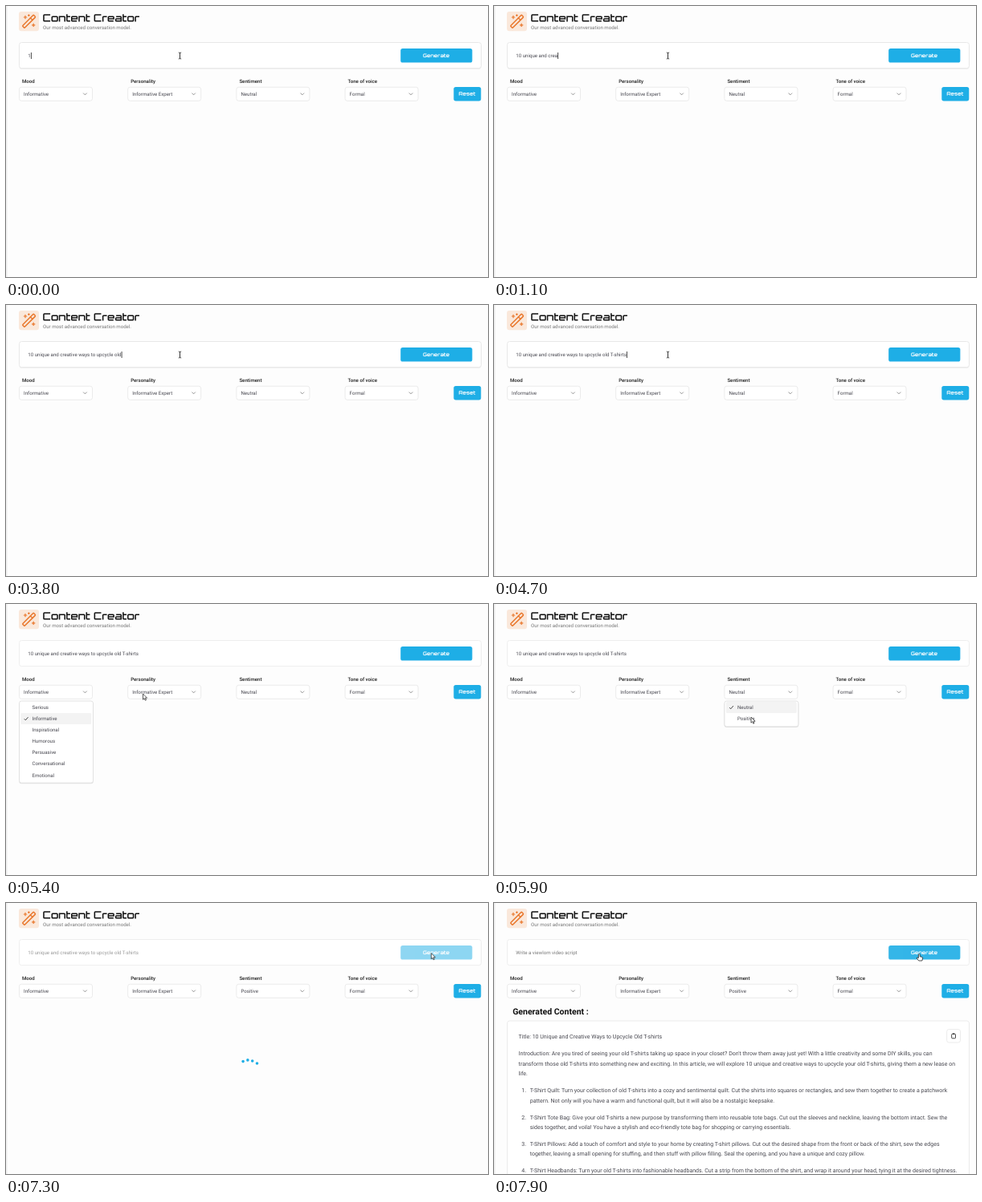
Recreate the animation shown at these times as an HTML page. Size 600 px wide and 338 px high, loop 8000 ms.

```html
<!DOCTYPE html>
<html lang="en">
<head>
<meta charset="utf-8">
<title>Content Creator</title>
<style>
  html, body { margin: 0; width: 100%; height: 100%; overflow: hidden; background: #fdfdfd; }
  svg { display: block; width: 600px; height: 338px; }
  text { font-family: Roboto, "Liberation Sans", sans-serif; font-size: 6.14px; white-space: pre; text-rendering: geometricPrecision; }
</style>
</head>
<body>
<svg id="stage" viewBox="0 0 600 338"></svg>
<script>
const LOOP = 8000, STEP = 100;
const BLUR = 5200, LOADING = 6900, DONE = 7600;
const BLUE = '#1eaee6', ORANGE = '#e9772c', PEACH = '#fae8db', EDGE = '#e9e9e9';
const PROMPT = '10 unique and creative ways to upcycle old T-shirts';
const HINT = 'Write a viewlom video script';

// Time, number of characters typed
const TYPED = [[0, 1], [900, 15], [1500, 23], [1600, 23], [2000, 27], [2200, 27], [3800, 42], [4600, 51]];

// Time, x, y of the pointer
const PATH = [
  [0, 216.5, 62], [4700, 216.5, 62], [5200, 60, 111], [5300, 62, 111],
  [5400, 170.5, 112], [5500, 172, 112], [5700, 322, 112], [5900, 320, 141],
  [6000, 321, 142], [6300, 455, 112], [6400, 456, 112], [6500, 456.5, 112],
  [6800, 529.3, 62.6]
];

const FIELDS = [
  { label: 'Mood', value: 'Informative', from: 5300, to: 5500,
    items: ['Serious', 'Informative', 'Inspirational', 'Humorous', 'Persuasive', 'Conversational', 'Emotional'] },
  { label: 'Personality', value: 'Informative Expert' },
  { label: 'Sentiment', value: 'Neutral', next: 'Positive', from: 5800, to: 6100,
    items: ['Neutral', 'Positive'] },
  { label: 'Tone of voice', value: 'Formal', from: 6300, to: 6600,
    items: ['Cheeky', 'Formal', 'Bold', 'Pirates'] }
];

const INTRO = [
  [167, 'Title: 10 Unique and Creative Ways to Upcycle Old T-shirts'],
  [188, "Introduction: Are you tired of seeing your old T-shirts taking up space in your closet? Don't throw them away just yet! With a little creativity and some DIY skills, you can"],
  [200.3, 'transform those old T-shirts into something new and exciting. In this article, we will explore 10 unique and creative ways to upcycle your old T-shirts, giving them a new lease on'],
  [212.6, 'life.']
];
const LIST = [
  ['T-Shirt Quilt: Turn your collection of old T-shirts into a cozy and sentimental quilt. Cut the shirts into squares or rectangles, and sew them together to create a patchwork',
   'pattern. Not only will you have a warm and functional quilt, but it will also be a nostalgic keepsake.'],
  ['T-Shirt Tote Bag: Give your old T-shirts a new purpose by transforming them into reusable tote bags. Cut out the sleeves and neckline, leaving the bottom intact. Sew the',
   'sides together, and voila! You have a stylish and eco-friendly tote bag for shopping or carrying essentials.'],
  ['T-Shirt Pillows: Add a touch of comfort and style to your home by creating T-shirt pillows. Cut out the desired shape from the front or back of the shirt, sew the edges',
   'together, leaving a small opening for stuffing, and then stuff with pillow filling. Seal the opening, and you have a unique and cozy pillow.'],
  ['T-Shirt Headbands: Turn your old T-shirts into fashionable headbands. Cut a strip from the bottom of the shirt, and wrap it around your head, tying it at the desired tightness.']
];

// Square display lettering: advance and stroke, 100 units per em
const GLYPHS = {
  ' ': [32, ''],
  C: [80, 'M73-66H16Q10-66 10-60V-12Q10-6 16-6H73'],
  G: [80, 'M73-66H16Q10-66 10-60V-12Q10-6 16-6H64Q70-6 70-12V-32H44'],
  R: [80, 'M10 0V-66H64Q70-66 70-60V-34Q70-28 64-28H10M50-28L70 0'],
  a: [72, 'M14-50H56Q62-50 62-44V-6H16Q10-6 10-12V-22Q10-28 16-28H62'],
  e: [72, 'M10-28H62V-44Q62-50 56-50H16Q10-50 10-44V-12Q10-6 16-6H60'],
  n: [72, 'M10 0V-50H56Q62-50 62-44V0'],
  o: [72, 'M16-50H56Q62-50 62-44V-12Q62-6 56-6H16Q10-6 10-12V-44Q10-50 16-50Z'],
  r: [52, 'M10 0V-44Q10-50 16-50H48'],
  s: [70, 'M60-50H16Q10-50 10-44V-34Q10-28 16-28H54Q60-28 60-22V-12Q60-6 54-6H10'],
  t: [46, 'M10-72V-12Q10-6 16-6H42M10-50H42']
};

const stage = document.getElementById('stage');

function at(keys, t, ease = k => k) {
  const i = keys.findIndex(k => k[0] > t);
  if (i < 0) return keys[keys.length - 1].slice(1);
  const a = keys[i - 1], b = keys[i];
  const k = ease((t - a[0]) / (b[0] - a[0]));
  return a.slice(1).map((v, n) => v + (b[n + 1] - v) * k);
}
const smooth = k => k * k * (3 - 2 * k);
const isBusy = t => t >= LOADING && t < DONE;
const overButton = ([x, y]) => x > 491 && y < 71;

const text = (x, y, str, fill = '#484850', extra = '') =>
  `<text x="${x}" y="${y}" fill="${fill}" ${extra}>${str}</text>`;

const box = (x, y, w, h, r, fill, stroke = 'none', extra = '') =>
  `<rect x="${x}" y="${y}" width="${w}" height="${h}" rx="${r}" fill="${fill}" stroke="${stroke}" ${extra}/>`;

const panel = (x, y, w, h, r, edge = EDGE) => box(x, y, w, h, r, '#fff', edge, 'stroke-width=".9"');

const line = (d, stroke, width, extra = '') =>
  `<path d="${d}" fill="none" stroke="${stroke}" stroke-width="${width}" ${extra}/>`;

function lettering(x, y, size, str, color, weight) {
  let pen = 0, out = '';
  for (const c of str) {
    const [advance, d] = GLYPHS[c];
    out += `<path d="${d}" transform="translate(${pen} 0)"/>`;
    pen += advance;
  }
  return `<g role="img" aria-label="${str}" fill="none" stroke="${color}" stroke-width="${weight}"
    transform="translate(${x} ${y}) scale(${size / 100})">${out}</g>`;
}

function wand() {
  const plus = (x, y, r) => line(`M${x - r} ${y}h${2 * r}M${x} ${y - r}v${2 * r}`, ORANGE, 1.2);
  return box(16, 7, 25, 24.3, 3, PEACH) +
    `<g stroke-linecap="round" stroke-linejoin="round">
      <g transform="rotate(-45 28.5 19.3)">${box(18.8, 17.5, 19.6, 3.7, 1, PEACH, ORANGE, 'stroke-width="1.5"')}
      ${line('M32.9 17.5v3.7', ORANGE, 1.4)}</g>
      ${plus(24, 14, 1.7)}${plus(34.2, 23.8, 1.7)}${plus(28.4, 11.6, .8)}</g>`;
}

function header() {
  return box(0, 0, 1.6, 338, 0, '#eeeeee') + wand() +
    lettering(45.7, 19.6, 12.88, 'Content Creator', '#111', 12) +
    text(46, 28.8, 'Our most advanced conversation model.', '#777');
}

function promptBar(t) {
  const done = t >= DONE, focused = t < BLUR;
  const count = Math.round(at(TYPED, t)[0]);
  const str = done ? HINT : PROMPT.slice(0, count);
  const fill = isBusy(t) ? '#999' : done ? '#777' : '#484850';
  const hover = overButton(at(PATH, t, smooth));
  const opacity = isBusy(t) ? .5 : hover ? .9 : 1;
  return (focused ? box(16.5, 46, 575, 33, 3, '#f1f1f1') : '') +
    panel(16.5, 45.5, 575, 32.2, 3, focused ? '#e6e6e6' : '#ededed') +
    text(27.3, 64, str, fill, 'id="prompt"') +
    (focused ? box(0, 58, .8, 8, 0, '#222', 'none', 'id="caret"') : '') +
    `<g opacity="${opacity}">` + box(491.2, 53.1, 89.2, 17.5, 2.6, BLUE) +
    lettering(519.1, 64, 6.14, 'Generate', '#fff', 14) + '</g>';
}

function fields(t) {
  return FIELDS.map((f, i) => {
    const dx = i * 135.2;
    const value = f.next && t >= f.to ? f.next : f.value;
    return text(20 + dx, 96, f.label, '#222', 'font-weight="500"') +
      panel(16.5 + dx, 101.2, 91, 17.1, 2.8) +
      text(22 + dx, 111.6, value) +
      line(`M${96.2 + dx} 108.6l2.2 2.2l2.2-2.2`, '#777', .8);
  }).join('') +
    box(557.3, 101, 34, 17.4, 2.6, BLUE) +
    lettering(563.6, 111.6, 6.14, 'Reset', '#fff', 14);
}

function menu(f, i) {
  const dx = i * 135.2, h = f.items.length * 14.05 + 3.8;
  const rows = f.items.map((item, n) => {
    const y = 129 + n * 14.05;
    const mark = item === f.value
      ? box(18.3 + dx, y - 7, 88, 14, 1.5, '#f3f3f3') +
        line(`M${22.8 + dx} ${y + .2}l1.5 1.6l3.2-3.7`, '#333', .9)
      : '';
    return mark + text(32.5 + dx, y + 2.2, item);
  }).join('');
  return box(16.2 + dx, 122, 92.6, h, 3, '#000', 'none', 'opacity=".1"') +
    panel(16.5 + dx, 121, 92, h, 2.8, '#dfdfdf') + rows;
}

function dots(t) {
  const phase = 147 + (t - 7300) / 600 * 360;
  return [0, 1, 2, 3].map(i => {
    const a = (phase - 51 * i) * Math.PI / 180;
    return `<circle cx="${295.1 + 5.8 * i}" cy="${199.6 - 3.7 * Math.sin(a)}" r="1.8" fill="${BLUE}"/>`;
  }).join('');
}

function article() {
  const body = (x, mid, str, extra = '') => text(x, mid + 2.3, str, '#484850', `style="font-size:7.02px" ${extra}`);
  let out = text(23.2, 139.2, 'Generated Content :', '#111', 'font-weight="700" style="font-size:10.53px"') +
    panel(16.5, 147, 575, 220, 3) +
    panel(563.7, 157.6, 16.8, 16.4, 2.6) +
    box(569.7, 163.4, 4.8, 5.4, .8, 'none', '#333', 'stroke-width=".9"') +
    box(570.8, 162.5, 2.6, 1.6, .4, '#333');
  for (const [y, str] of INTRO) out += body(30.6, y, str);
  LIST.forEach((lines, i) => {
    const y = 234 + i * 33.35;
    out += body(40, y, i + 1 + '.', 'text-anchor="end"');
    lines.forEach((str, n) => out += body(44.7, y + n * 12.3, str));
  });
  return out;
}

function pointer(t) {
  const pos = at(PATH, t, smooth), [x, y] = pos;
  const overText = x < 488 && y > 46 && y < 78;
  let shape;
  if (overText) {
    shape = line('M-1.6-4Q0-4 0-3V3Q0 4-1.6 4M1.6-4Q0-4 0-3V3Q0 4 1.6 4', '#333', .9);
  } else if (overButton(pos) && !isBusy(t)) {
    shape = '<path d="M-.9 1.4Q0 .2.9 1.4V4.2L3.6 4.8Q4.6 5.2 4.3 6.6L3.6 9.4H-.6L-3 6.4Q-3.1 5.1-1.8 5.5L-.9 6.2Z" fill="#fff" stroke="#222" stroke-width=".8" stroke-linejoin="round"/>';
  } else {
    shape = '<path d="M0 0V7.2L1.7 5.7L2.8 8.2L4 7.7L2.9 5.2H5.1Z" fill="#fff" stroke="#333" stroke-width=".8" stroke-linejoin="round"/>';
  }
  return `<g transform="translate(${x} ${y})">${shape}</g>`;
}

function draw(t) {
  let out = header() + promptBar(t) + fields(t);
  FIELDS.forEach((f, i) => { if (f.items && t >= f.from && t < f.to) out += menu(f, i); });
  if (t >= DONE) out += article();
  else if (t >= LOADING) out += dots(t);
  stage.innerHTML = out + pointer(t);

  const caret = document.getElementById('caret');
  if (caret) caret.setAttribute('x', 27.5 + document.getElementById('prompt').getComputedTextLength());
}

let shown = -1;
function tick() {
  const t = Math.floor(performance.now() % LOOP / STEP) * STEP;
  if (t !== shown) draw(shown = t);
  requestAnimationFrame(tick);
}
tick();
</script>
</body>
</html>
```
